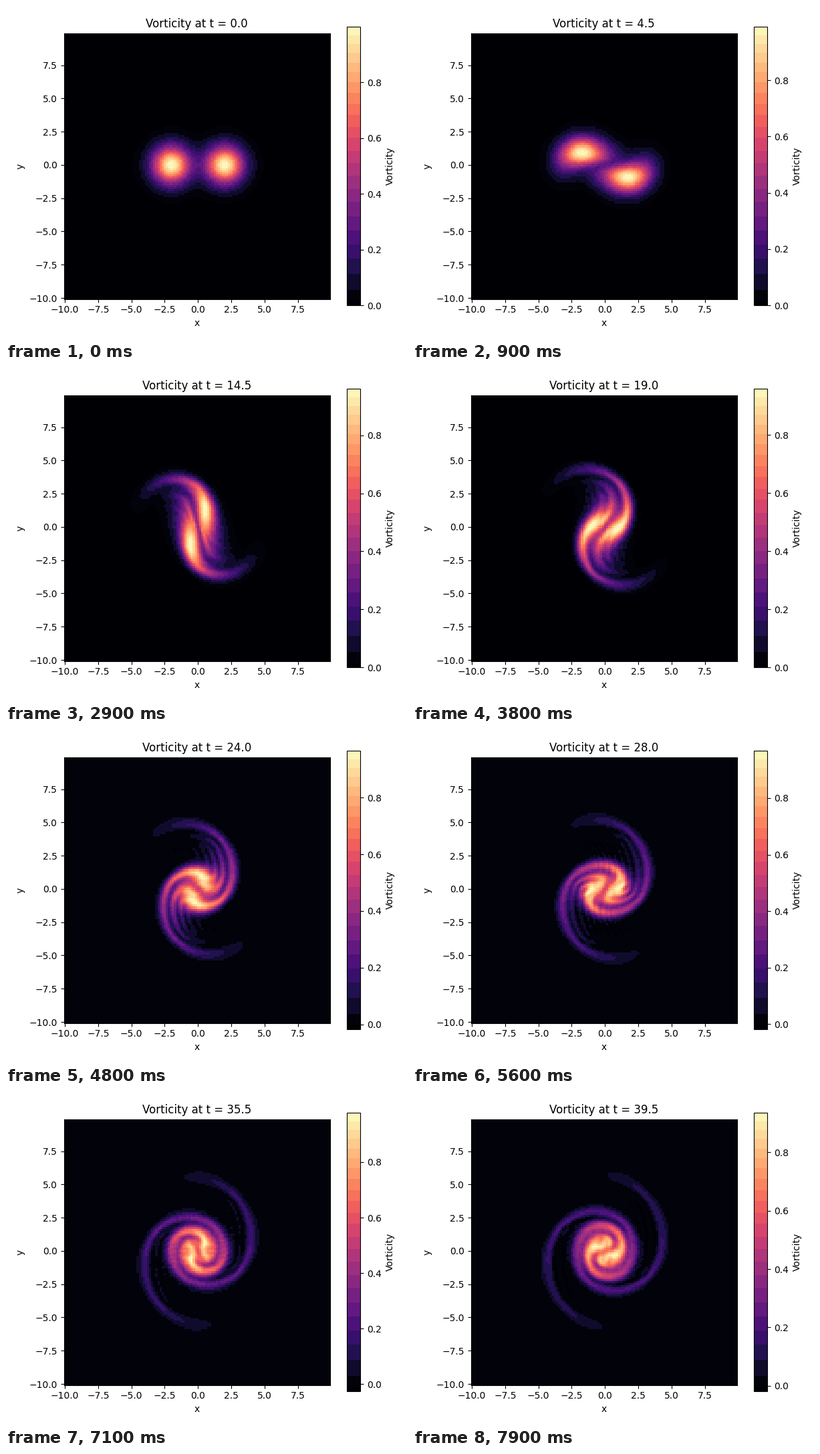
Recreate the animation shown at these times as a matplotlib script. Size 600 by 500 pixels, loop 8000 ms.

```python
import numpy as np
import matplotlib.pyplot as plt
from matplotlib.animation import FuncAnimation
from matplotlib.colors import ListedColormap

W, H, DPI = 600, 500, 100
FRAMES, INTERVAL = 80, 100
N, SIZE, NU = 128, 20.0, 0.001
FRAME_DT, SUBSTEPS = 0.5, 5

h = SIZE / N
x = -SIZE / 2 + h * np.arange(N)
X, Y = np.meshgrid(x, x)

# Wavenumbers for the Poisson solve
kx = 2 * np.pi * np.fft.rfftfreq(N, h)
ky = 2 * np.pi * np.fft.fftfreq(N, h)
K2 = kx[None, :] ** 2 + ky[:, None] ** 2
K2[0, 0] = 1.0


def neighbours(f, axis):
    return np.roll(f, -1, axis), np.roll(f, 1, axis)


def slope(f, axis):
    ahead, behind = neighbours(f, axis)
    return (ahead - behind) / (2 * h)


def rhs(w):
    """Advection-diffusion of vorticity with central differences."""
    psi = np.fft.irfft2(-np.fft.rfft2(w) / K2, s=w.shape)
    right, left = neighbours(w, 1)
    up, down = neighbours(w, 0)
    wx, wy = (right - left) / (2 * h), (up - down) / (2 * h)
    lap = (right + left + up + down - 4 * w) / h**2
    return slope(psi, 1) * wy - slope(psi, 0) * wx + NU * lap


def rk4(w, dt):
    a = rhs(w)
    b = rhs(w + dt / 2 * a)
    c = rhs(w + dt / 2 * b)
    d = rhs(w + dt * c)
    return w + dt / 6 * (a + 2 * b + 2 * c + d)


def simulate():
    w = sum(np.exp(-((X - c) ** 2 + Y**2) / 2) for c in (-2, 2))
    fields = [w]
    while len(fields) < FRAMES:
        for _ in range(SUBSTEPS):
            w = rk4(w, FRAME_DT / SUBSTEPS)
        fields.append(w)
    return fields


def banded_magma(bands=23):
    """Magma in flat bands that get narrower towards the bright end."""
    base = plt.get_cmap("magma")(np.arange(256))
    widths = np.linspace(14.5, 7.8, bands)
    edges = np.rint(np.cumsum(widths) * 256 / widths.sum()).astype(int)
    lut = base.copy()
    start = 0
    for end in edges:
        lut[start:end] = base[start:end].mean(axis=0)
        start = end
    # The darkest band stays near black
    lut[:4] = base[0]
    lut[4:edges[0]] = base[5]
    return ListedColormap(lut)


def heading(i):
    return f"Vorticity at t = {i * FRAME_DT:.1f}"


fields = simulate()

fig, ax = plt.subplots(figsize=(W / DPI, H / DPI), dpi=DPI, facecolor="white")
mesh = ax.pcolormesh(X, Y, fields[0], cmap=banded_magma(), shading="nearest")
ax.set_aspect("equal")
ticks = np.arange(-10, 8, 2.5)
ax.set_xticks(ticks)
ax.set_yticks(ticks)
ax.set_xlabel("x")
ax.set_ylabel("y")
title = ax.set_title(heading(0))
fig.colorbar(mesh, ax=ax, label="Vorticity")
fig.tight_layout()


def update(i):
    w = fields[i]
    mesh.set_array(w)
    mesh.set_clim(w.min(), w.max())
    title.set_text(heading(i))
    return mesh, title


anim = FuncAnimation(fig, update, frames=FRAMES, interval=INTERVAL,
                     init_func=lambda: update(0), repeat=True,
                     repeat_delay=0, blit=False)
plt.show()
```
